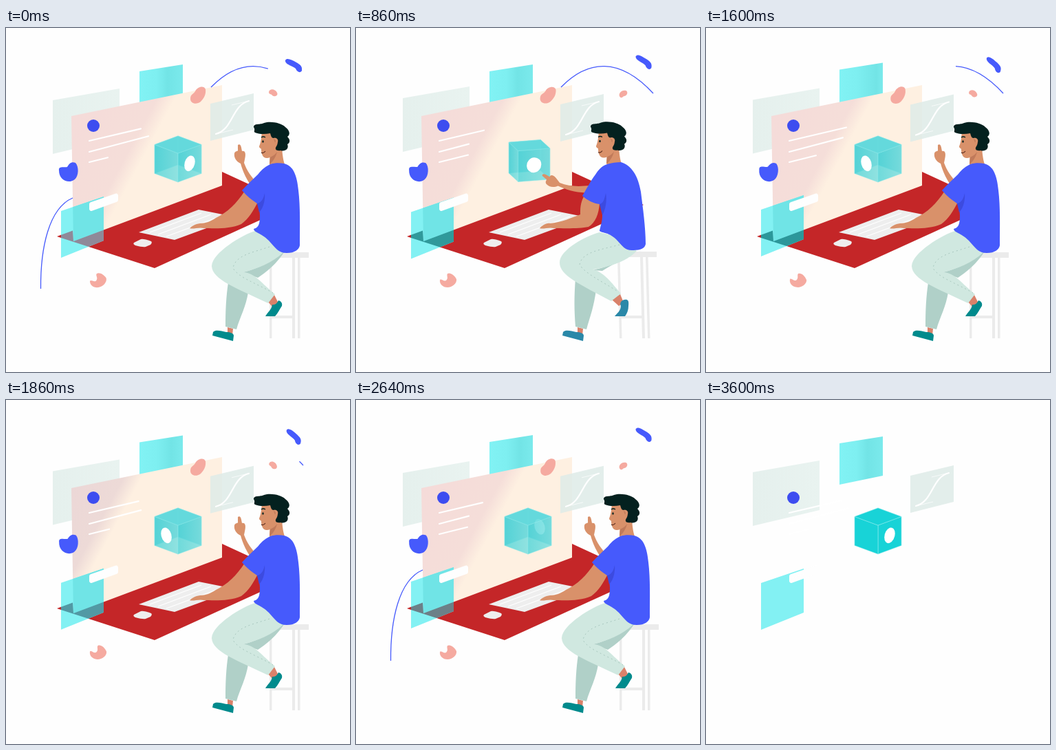
These frames come from a looping animation (500 px wide and 500 px high, 3.62 s). An HTML page:

```html
<!DOCTYPE html>
<html lang="en">
<head>
<meta charset="utf-8">
<title>Desk scene</title>
<style>
html, body { margin: 0; width: 100%; height: 100%; overflow: hidden; background: #fefefe; }
svg { display: block; width: 100vw; height: 100vh; }
</style>
</head>
<body>
<svg viewBox="0 0 500 500" fill="none">
  <defs>
    <linearGradient id="tint" gradientUnits="userSpaceOnUse">
      <stop id="tintA" stop-color="#f5dad9"/><stop id="tintB" offset=".85" stop-color="#f5ded9"/><stop offset="1" stop-color="#fef0e1"/>
    </linearGradient>
    <linearGradient id="aqua"><stop stop-color="#81f2f4"/><stop offset=".4" stop-color="#7eeff1"/><stop id="aquaMid" offset=".7" stop-color="#72e4e6"/><stop offset="1" stop-color="#7beaec"/></linearGradient>
    <linearGradient id="mint"><stop stop-color="#e5f0ed"/><stop offset="1" stop-color="#e9f3f0"/></linearGradient>
    <linearGradient id="side"><stop stop-color="#4fd5d9"/><stop offset="1" stop-color="#79dfe0"/></linearGradient>
    <clipPath id="inLow"><path id="lowClip" d="M80 266L142 245V309L80 334Z"/></clipPath>
  </defs>

  <path id="mintPanel" d="M68 105L165 88V160L68 183Z" fill="url(#mint)"/>
  <path id="topPanel" d="M194 63L257 53V110L194 123Z" fill="url(#aqua)"/>

  <g class="scene">
    <path d="M74 303L314 209L418 257L216 349Z" fill="#c42628"/>
    <path d="M95 128L314 83V229L98 310Z" fill="url(#tint)"/>
    <path d="M193 297L280 264L335 275L245 308Z" fill="#eee"/>
    <path d="M209 297L284 269M221 300L298 271M233 303L311 274" stroke="#fff" stroke-width="1.3"/>
    <path d="M186 312L196 307Q200 306 211 310Q213 312 210 315L203 318Q199 319 188 316Q184 314 186 312Z" fill="#eee"/>
  </g>

  <path id="lowPanel" d="M80 266L142 245V309L80 334Z" fill="#83f1f3"/>
  <g class="scene" clip-path="url(#inLow)">
    <path d="M95 128L314 83V229L98 310Z" fill="#70e4e6"/>
    <path id="shade" d="M74 303L97 294.500L98 310L314 229V320L216 349Z"/>
  </g>
  <path class="scene" id="curveL" d="M50.500 379C50 320 62 262 97 247" stroke="#465afc" stroke-width="1.300" pathLength="100"/>

  <circle cx="127" cy="142" r="9" fill="#3d4df0"/>
  <g stroke="#fff" stroke-width="2.200" stroke-linecap="round"><path id="row0"/><path id="row1"/><path id="row2"/></g>
  <path d="M124 256L160 243.500V250L124 263Z" fill="#fefefe" stroke="#fefefe" stroke-width="6" stroke-linejoin="round"/>

  <g id="graph">
    <path d="M297 110L360 95V148L297 164Z" fill="#dfece8" fill-opacity=".86"/>
    <path d="M305 154C330 148 328 112 353 106" stroke="#fff" stroke-width="2.200" stroke-linecap="round"/>
    <path d="M305 154L330 148M328 112L353 106" stroke="#fff" stroke-width=".7"/>
  </g>
  <g id="cube" stroke-linejoin="round"></g>

  <g class="scene">
    <path id="curveR" d="M298 86C337 46 383 42 432 95" stroke="#465afc" stroke-width="1.300" pathLength="100"/>
    <path id="blob0" fill="#465afc" d="M77 207C76 200 84 203 89 202C92 197 95 194 101 196C106 201 106 215 100 220C92 227 77 222 77 207Z"/>
    <path id="blob1" fill="#f5aaa0" d="M268 103C268 96 272 97 275 92C278 85 288 83 290 89C291 96 288 102 283 107C277 112 268 110 268 103Z"/>
    <path id="blob2" fill="#f5aaa0" d="M122 366C121 372 126 377 133 377C140 377 147 371 146 365C143 359 137 355 133 357C131 360 135 363 131 367C128 369 124 364 122 366Z"/>
    <path id="blob3" fill="#465afc" d="M406 47C408 43 415 46 422 50C427 53 431 55 430 62C428 66 423 64 421 59C417 55 405 53 406 47Z"/>
    <path id="blob4" fill="#f5aaa0" d="M382 93C383 88 391 88 394 94C396 98 391 101 387 98C385 95 382 97 382 93Z"/>

    <path id="stool" fill="#ebebeb"/>
    <path id="farArm" fill="#d9916a" d="M337 170C341 167 342 173 343 179C348 178 349 183 347 191L346 196C350 207 356 216 366 226L378 238L368 246L360 234C350 222 344 208 341 197C335 194 331 189 332 182C334 177 338 181 337 176Z"/>
    <path fill="#d9816a" d="M322 435L330 437L329 447L322 444Z"/>
    <path class="shoe" d="M301 442C304 438 313 440 320 442C326 442 331 444 331 447L330 455L300 447Z"/>
    <path id="farLeg" fill="#b0d0c8"/>
    <path id="ankle" fill="#d9816a"/>
    <path id="nearShoe" class="shoe"/>
    <path id="pants" fill="#d0e8e0"/>
    <path id="seam" stroke="#a9c8bf" stroke-width="1" stroke-dasharray="2 4"/>
    <g id="head">
      <path fill="#d9916a" d="M384 176L401 174C402 186 403 192 405 198Q394 203 383 198Z"/>
      <path fill="#c07a5a" d="M384 187C389 186 392 183 394 180C392 188 388 194 383 198Z"/>
      <path fill="#d9916a" d="M372 150C371 160 371 165 368 172C368 175 371 175 371 176C371 184 374 190 380 189C387 188 394 182 396 172L393 150Z"/>
      <path fill="#04211f" d="M360 144C360 138 370 141 375 138C385 135 400 138 406 144C412 148 414 155 409 158C415 164 411 168 409 169C412 176 405 180 399 178C393 179 390 176 393 172C397 166 394 158 389 160C385 160 385 155 384 153C376 155 366 154 362 152C359 150 363 149 360 144Z"/>
      <circle cx="391" cy="164" r="4.300" fill="#d9916a"/>
      <path d="M389 162Q392 162 391 166" stroke="#b06c50" stroke-width=".8"/>
      <ellipse cx="373.500" cy="165" rx="1.200" ry="1.700" fill="#04211f"/>
      <path d="M371 159Q374 157 377 159" stroke="#04211f" stroke-width="1.300"/>
      <path d="M371 181Q374 183 377 179" stroke="#53281d" stroke-width="1.100"/>
    </g>
    <path id="nearArm" fill="#d9916a"/>
    <path id="shirt" fill="#465afc"/>
    <path id="fold" fill="#3c4be0"/>
  </g>
</svg>
<script>
const LOOP = 3620;
const TIMES = [0, 860, 1600, 2140, 2640, 3100, LOOP];
const el = id => document.getElementById(id);
const set = (id, name, value) => el(id).setAttribute(name, value);
const lerp = (a, b, p) => a + (b - a) * p;
const ramp = (t, a, b) => Math.min(1, Math.max(0, (t - a) / (b - a)));
const soft = x => (1 - Math.cos(Math.PI * x)) / 2;
const cubic = x => x < .5 ? 4 * x ** 3 : 1 - 4 * (1 - x) ** 3;
const rgb = c => `rgb(${c.map(Math.round)})`;

// Six values spread over TIMES, closing on the first.
function key(t, v) {
  let i = 0;
  while (i < 5 && t >= TIMES[i + 1]) i++;
  return lerp(v[i], v[(i + 1) % 6], soft(ramp(t, TIMES[i], TIMES[i + 1])));
}

// Blend two paths that share one command structure.
function blend(a, b, p) {
  const to = b.match(/-?[\d.]+/g);
  let i = 0;
  return a.replace(/-?[\d.]+/g, n => lerp(+n, +to[i++], p).toFixed(2));
}

// Seat, three legs and a crossbar; lean shifts the upper end.
function stoolPath(lean) {
  const quad = (x, w, top, end) => `M${x - lean} ${top}L${x + w - lean} ${top}L${x + w} ${end}L${x} ${end}Z`;
  const seatY = 326 - lean / 3;
  return `M385 ${seatY}H${440 - lean}V${seatY + 8}H385Z` +
    quad(383, 3.5, 333, 451) + quad(416, 4, 333, 451) + quad(424, 3.5, 333, 451) + "M385 418H418V422H385Z";
}

const poses = {
  farLeg: ["M323 370L352 384C349 405 340 420 335 438L319 434C319 410 320 390 323 370ZM344 355C365 350 388 340 398 325L404 326C392 345 374 358 366 363Z",
           "M319 364L349 380C346 405 340 420 335 438L319 434C317 410 317 390 319 364ZM344 352C365 347 388 340 398 322L406 324C390 336 370 345 358 353Z"],
  ankle: ["M379 396L390 388L396 400L387 405Z", "M371 394L384 387L389 399L382 404Z"],
  nearShoe: ["M377 419C380 413 386 410 387 402C391 403 394 400 396 396C400 397 402 400 401 404C397 410 395 415 391 419Z",
             "M376 419C379 415 385 411 385 404C383 400 385 396 390 395C395 394 397 396 396 404C396 410 394 415 391 419Z"],
  pants: ["M362 295C345 300 300 326 299 346C300 366 335 378 381 400L391 387C372 372 362 356 345 355C364 350 388 341 402 327L385 305Z",
          "M354 297C335 302 296 322 296 341C296 360 325 372 371 397L385 386C372 371 360 354 344 351C364 348 392 341 408 324L380 303Z"],
  seam: ["M383 318C360 326 333 330 330 349C338 363 362 370 388 385", "M383 315C358 322 328 325 325 344C334 358 358 368 382 384"],
  nearArm: ["M347 237C335 255 322 268 305 276C298 281 290 284 282 284C275 285 270 288 267 291C272 293 280 289 288 291C300 291 325 293 342 285C352 278 360 265 366 253Z",
            "M331 245C326 255 326 262 326 271C315 275 298 283 282 284C276 283 270 288 267 291C272 293 280 289 288 291C300 291 325 292 338 289C348 283 353 270 354 255Z"],
  shirt: ["M384 198C374 203 370 208 366 213C358 221 350 228 343 236C350 244 357 250 365 255C369 262 370 275 368 284C366 291 362 291 360 292C361 298 370 297 382 309C392 320 396 327 408 327C420 327 426 322 427 316C427 290 428 260 425 236C423 215 418 200 404 197C398 196 390 196 384 198Z",
          "M365 198C356 201 352 207 348 213C341 222 335 234 329 244C337 251 345 255 354 256C358 262 359 272 357 282C355 291 354 293 354 295C360 299 366 296 378 307C388 318 392 324 403 323C414 323 420 320 421 314C421 290 417 262 414 238C410 215 401 200 385 195C379 195 371 196 365 198Z"],
  fold: ["M376 240C374 250 370 254 365 255L368 268C374 262 377 250 376 240Z", "M363 240C361 250 359 255 354 256L358 272C363 264 365 250 363 240Z"]
};

const rows = [
  [164, .235, [196, 186, 204, 180, 184, 204]],
  [180, .265, [207, 164, 199, 193, 164, 183]],
  [195, .25, [148, 163, 160, 139, 162, 176]]
];
// Centre, turn and lift of each blob.
const still = [0, 0, 0, 0, 0, 0];
const blobs = [
  [91, 210, [0, 2, 5, 0, 3, 0], still],
  [279, 97, [0, 4, -3, 3, -2, 2], still],
  [134, 367, [-8, 0, 6, 0, 0, -6], still],
  [418, 54, [0, 5, 14, 12, 5, 0], [0, -5, -1, -1, -4, -3]],
  [388, 94, [0, -60, 5, 25, -60, -20], [0, 2, 1, 0, 2, 1]]
];

function drawCube(t, solid, push) {
  const turn = 45 - 90 * cubic(ramp(t, 620, 1180)) - 180 * cubic(ramp(t, 2160, 2640)) - 90 * cubic(ramp(t, 2680, 3100));
  const cx = 250 + 2 * push, top = 169.5 + push, tall = 42 + 3 * push, k = .37 - .1 * push, half = 24;
  const corner = a => [cx + 34 * Math.sin(a), top + 34 * k * Math.cos(a)];
  const drop = ([x, y]) => [x, y + tall];
  const poly = (pts, fill, alpha) =>
    `<path d="M${pts.map(p => p.map(n => n.toFixed(2)).join(" ")).join("L")}Z" fill="${fill}" fill-opacity="${alpha}" stroke="${solid ? "#a5eff0" : "#8ce9e9"}" stroke-width=".5"/>`;
  const faces = [0, 1, 2, 3].map(i => ({ i, a: (turn + i * 90) * Math.PI / 180 }))
    .sort((p, q) => Math.cos(p.a) - Math.cos(q.a));
  let out = "";
  for (const { i, a } of faces) {
    const l = corner(a - Math.PI / 4), r = corner(a + Math.PI / 4), front = Math.cos(a) > 0;
    const fill = solid ? "#18d3d7" : front ? "url(#side)" : "#39b9c0";
    out += poly([l, r, drop(r), drop(l)], fill, solid ? 1 : front ? .82 : .75);
    if (i === 0) {
      const m = [Math.cos(a), -k * Math.sin(a), 0, 1, cx + half * Math.sin(a), top + tall / 2 + half * k * Math.cos(a)];
      out += `<circle r="11" fill="#fff" transform="matrix(${m})"/>`;
    }
  }
  out += poly(faces.map(f => f.a).sort((p, q) => p - q).map(a => corner(a + Math.PI / 4)), solid ? "#18d3d7" : "#64dcde", solid ? 1 : .9);
  el("cube").innerHTML = out;
}

function trim(id, from, to) {
  set(id, "opacity", to - from < .002 ? 0 : 1);
  set(id, "stroke-dasharray", `0 ${from * 100} ${Math.max(0, to - from) * 100} 200`);
}

function draw(t) {
  const bare = t >= 3599;
  for (const g of document.querySelectorAll(".scene")) g.style.visibility = bare ? "hidden" : "visible";

  const bob = (id, v) => set(id, "transform", `translate(0 ${key(t, v)})`);
  bob("mintPanel", [0, -3, -.5, -2.5, 1, -2.5]);
  bob("topPanel", [0, 0, -2.5, -.3, -2, -1]);
  bob("graph", [0, 1, 1.5, 0, .8, 0]);
  const low = [0, 1.5, -2, 1.5, -2, 1];
  bob("lowPanel", low);
  bob("lowClip", low);
  set("aquaMid", "offset", key(t, [.65, .65, .85, .6, .7, .75]));

  set("shade", "fill", rgb([
    key(t, [143, 48, 44, 125, 108, 68]),
    key(t, [137, 153, 151, 155, 128, 160]),
    key(t, [153, 155, 154, 176, 136, 162])
  ]));

  const s = key(t, [265, 260, 262, 188, 264, 254]);
  const start = s - 155;
  set("tint", "x1", .88 * start); set("tint", "y1", .476 * start);
  set("tint", "x2", .88 * s); set("tint", "y2", .476 * s);
  const grey = key(t, [0, 0, 0, 1, 0, 0]);
  set("tintA", "stop-color", rgb([lerp(245, 222, grey), lerp(218, 206, grey), lerp(217, 211, grey)]));
  set("tintB", "stop-color", rgb([lerp(245, 228, grey), lerp(222, 213, grey), lerp(217, 213, grey)]));

  rows.forEach(([y, slope, v], i) => {
    const x = key(t, v);
    set("row" + i, "d", `M121 ${y}L${x} ${y - (x - 121) * slope}`);
  });
  blobs.forEach(([x, y, turn, lift], i) =>
    set("blob" + i, "transform", `translate(0 ${key(t, lift)}) rotate(${key(t, turn)} ${x} ${y})`));

  // The right arc keeps drawing across the loop point.
  const u = t < 1960 ? t + LOOP : t;
  trim("curveR", t < 3200 ? soft(ramp(t, 1150, 1960)) ** 1.4 : 0, 1 - (1 - ramp(u, 3200, 4270)) ** 1.8);
  trim("curveL", t < 2000 ? soft(ramp(t, 450, 850)) : 0,
    t < 2000 ? 1 : t < 2130 ? 0 : Math.max(.006, soft(ramp(t, 2130, 2600))));

  const p = cubic(ramp(t, 120, 600)) * (1 - cubic(ramp(t, 1060, 1520)));
  for (const id in poses) set(id, "d", blend(...poses[id], p));
  set("stool", "d", stoolPath(3 * p));
  set("farArm", "transform", `translate(${-28 * p} ${-p}) rotate(${-49 * p} 368 235)`);
  set("head", "transform", `translate(${-19 * p} ${-.5 * p})`);
  const shoe = rgb([lerp(0, 42, p), lerp(138, 136, p), lerp(140, 168, p)]);
  for (const n of document.querySelectorAll(".shoe")) n.setAttribute("fill", shoe);
  drawCube(t, bare, p);
}

function tick(now) {
  draw(now % LOOP);
  requestAnimationFrame(tick);
}
draw(0);
requestAnimationFrame(tick);
</script>
</body>
</html>
```
